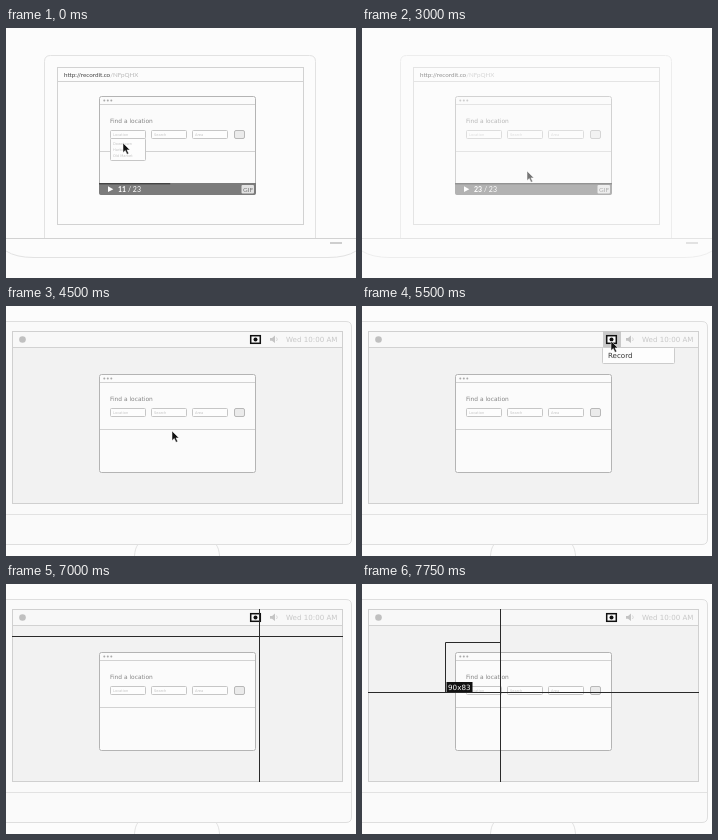
An HTML page for the animation above (8000 ms loop, 350 by 250 pixels).

```html
<!DOCTYPE html>
<html lang="en">
<head>
<meta charset="utf-8">
<title>Screen recording demo</title>
<style>
  html, body { margin: 0; width: 100%; height: 100%; overflow: hidden; background: #fcfcfc; }
  svg { display: block; width: 100vw; height: 100vh; }
  text { font-family: "DejaVu Sans", sans-serif; white-space: pre; }
  .line { fill: none; stroke: #d2d2d2; }
  .faint { fill: none; stroke: #e2e2e2; }
  .field { fill: #fdfdfd; stroke: #c6c6c6; }
  .hint { font-size: 3.6px; fill: #c4c4c4; }
  .url, .player text { font-family: Lato, sans-serif; }
  .url { font-size: 6.25px; fill: #444; }
  .player text { font-size: 7px; fill: #fff; }
  .cross { fill: none; stroke: #2a2a2a; }
</style>
</head>
<body>
<svg viewBox="0 0 350 250">
  <defs>
    <path id="arrow" d="M0 0V9.6L2.3 7.5L4 11.3L5.7 10.5L4 6.9H7Z" fill="#111" stroke="#fff" stroke-width=".5"/>
    <g id="window">
      <rect x="93.5" y="68.5" width="156" height="98" rx="2" fill="#fbfbfb" stroke="#b4b4b4"/>
      <path class="line" d="M94 76.5H249M94 123.5H249"/>
      <g fill="#aaa">
        <circle cx="98.3" cy="72.6" r="1"/>
        <circle cx="101.8" cy="72.6" r="1"/>
        <circle cx="105.3" cy="72.6" r="1"/>
      </g>
      <text x="104" y="95" font-size="5.9" fill="#858585">Find a location</text>
      <rect class="field" x="104.5" y="102.5" width="35" height="8" rx="1"/>
      <rect class="field" x="145.5" y="102.5" width="35" height="8" rx="1"/>
      <rect class="field" x="186.5" y="102.5" width="35" height="8" rx="1"/>
      <text class="hint" x="107" y="108">Location</text>
      <text class="hint" x="148" y="108">Search</text>
      <text class="hint" x="189" y="108">Area</text>
      <rect x="228.5" y="102.5" width="10" height="8" rx="1.5" fill="#ebebeb" stroke="#b8b8b8"/>
    </g>
  </defs>

  <g id="laptop">
    <path class="faint" d="M38.5 210V33.5Q38.5 27.5 44.5 27.5H303.5Q309.5 27.5 309.5 33.5V210"/>
    <path class="line" d="M0 210.5H350"/>
    <path class="faint" d="M0 223Q10 229.5 28 229.5H322Q340 229.5 350 223"/>
    <path d="M324 215H336" stroke="#c4c4c4" stroke-width="1.6"/>
    <rect class="line" x="51.5" y="39.5" width="246" height="157"/>
    <rect class="line" x="51.5" y="39.5" width="246" height="14"/>
    <text class="url" x="58" y="49">http://recordit.co<tspan fill="#b8b8b8">/NFpQHX</tspan></text>
    <use href="#window"/>
    <g id="dropdown">
      <rect class="field" x="104.5" y="110.5" width="35" height="22" rx="1"/>
      <text class="hint" x="107" y="117">Downtown</text>
      <text class="hint" x="107" y="123">Harbor</text>
      <text class="hint" x="107" y="129">Old Market</text>
    </g>
    <g class="player">
      <path d="M93 155H250V165Q250 167 248 167H95Q93 167 93 165Z" fill="#7b7b7b"/>
      <rect id="progress" x="93" y="155" height="1.4" fill="#444"/>
      <path d="M102 158.3V164L107.3 161.2Z" fill="#fff"/>
      <text x="112" y="163.7"><tspan id="count" font-weight="bold"></tspan> / 23</text>
      <rect x="235.5" y="157" width="12.5" height="8.4" rx="1" fill="#e2e2e2"/>
      <text x="237" y="163.6" style="font-size:6.4px;fill:#777">GIF</text>
    </g>
    <use class="pointer" href="#arrow"/>
  </g>

  <g id="desktop">
    <path d="M-5 15.5H340Q345.5 15.5 345.5 21V233Q345.5 238.5 340 238.5H-5Z" fill="#fafafa" stroke="#dedede"/>
    <path class="faint" d="M0 208.5H345M128.5 250Q129 242 132 238.5M213.5 250Q213 242 210 238.5"/>
    <rect x="6.5" y="25.5" width="330" height="172" fill="#f2f2f2" stroke="#d0d0d0"/>
    <path d="M7 26H336V41H7Z" fill="#f8f8f8"/>
    <path class="line" d="M7 41.5H336"/>
    <circle cx="16.5" cy="33.5" r="3.3" fill="#c0c0c0"/>
    <path d="M264 32H266L269 29.5V37L266 34.8H264Z" fill="#c4c4c4"/>
    <path d="M270.5 31.5Q272 33.3 270.5 35" fill="none" stroke="#d0d0d0" stroke-width=".8"/>
    <text x="280" y="36" font-size="7.1" fill="#c8c8c8">Wed 10:00 AM</text>
    <use href="#window"/>
    <g id="menu">
      <rect x="241" y="25" width="18" height="16" fill="#c9c9c9"/>
      <rect x="240.5" y="41.5" width="72" height="16" rx="1" fill="#fdfdfd" stroke="#ccc"/>
      <rect id="hover" x="241" y="42" width="71" height="15" fill="#dcdcdc"/>
      <text x="246" y="52" font-size="7.1" fill="#333">Record</text>
    </g>
    <rect x="244.7" y="29.7" width="9.6" height="7.6" fill="#fafafa" stroke="#111" stroke-width="1.5"/>
    <circle cx="249.5" cy="33.5" r="2" fill="#111"/>
    <use class="pointer" href="#arrow"/>
    <path id="cross" class="cross"/>
    <g id="selection">
      <path id="edge" class="cross"/>
      <rect id="tag" width="26" height="10" fill="#111"/>
      <text id="size" font-size="7.2" fill="#fff"></text>
    </g>
  </g>
</svg>
<script>
const LOOP = 8000, STEP = 250, SCALE = 0.6;
const START = [84, 58];
const $ = id => document.getElementById(id);
const pointers = document.querySelectorAll('.pointer');

// Each key holds its value until the next: [ms, ...values]
const counter = [[0, 11], [250, 14], [500, 19], [750, 21], [1000, 23]];
const laptopFade = [[0, 1], [3000, 0.57], [3250, 0.08], [3500, 0]];
const pointer = [
  [0, 117, 115], [250, 142, 108], [500, 178, 118], [750, 190, 130], [1000, 165, 143],
  [4500, 166, 125], [4750, 205, 84], [5000, 244, 39], [5250, 247, 34], [5500, 249, 35],
  [5750, 249, 34], [6000, 258, 48], [6250, 256, 47], [6500, 255, 46], [6750, 260, 47]
];
const aim = [[7000, 253, 52], [7250, 160, 55], [7500, ...START], [7750, 138, 108]];

const at = (track, t) => (track.findLast(key => key[0] <= t) || track[0]).slice(1);
const show = (el, on) => el.setAttribute('visibility', on ? 'inherit' : 'hidden');
const set = (el, attrs) => {
  for (const name in attrs) el.setAttribute(name, attrs[name]);
};

function drawLaptop(t) {
  const [opacity] = at(laptopFade, t);
  const [n] = at(counter, t);
  set($('laptop'), { opacity });
  show($('dropdown'), t < 250);
  $('count').textContent = n;
  set($('progress'), { width: n === 23 ? 157 : 156 * (n - 0.5) / 23 });
}

function drawDesktop(t) {
  show($('desktop'), t >= 4500);
  show($('menu'), t >= 5500 && t < 7000);
  show($('hover'), t >= 6250 && t < 7000);
  show($('cross'), t >= 7000);
  show($('selection'), t >= 7750);

  const [x, y] = at(aim, t);
  const [x0, y0] = START;
  set($('cross'), { d: `M6 ${y + .5}H337M${x + .5} 25V198` });
  set($('edge'), { d: `M${x0 - .5} ${y}V${y0 + .5}H${x}` });
  set($('tag'), { x: x0 + .5, y: y - 10 });
  set($('size'), { x: x0 + 2, y: y - 2.2 });
  $('size').textContent = [x - x0, y - y0].map(v => Math.round(v / SCALE)).join('x');
}

function draw(now) {
  const t = Math.floor(now % LOOP / STEP) * STEP;
  drawLaptop(t);
  drawDesktop(t);
  for (const el of pointers) {
    set(el, { transform: `translate(${at(pointer, t)})` });
    show(el, t < 7000);
  }
}

const begin = performance.now();
function tick() {
  draw(performance.now() - begin);
  requestAnimationFrame(tick);
}
tick();
</script>
</body>
</html>
```
